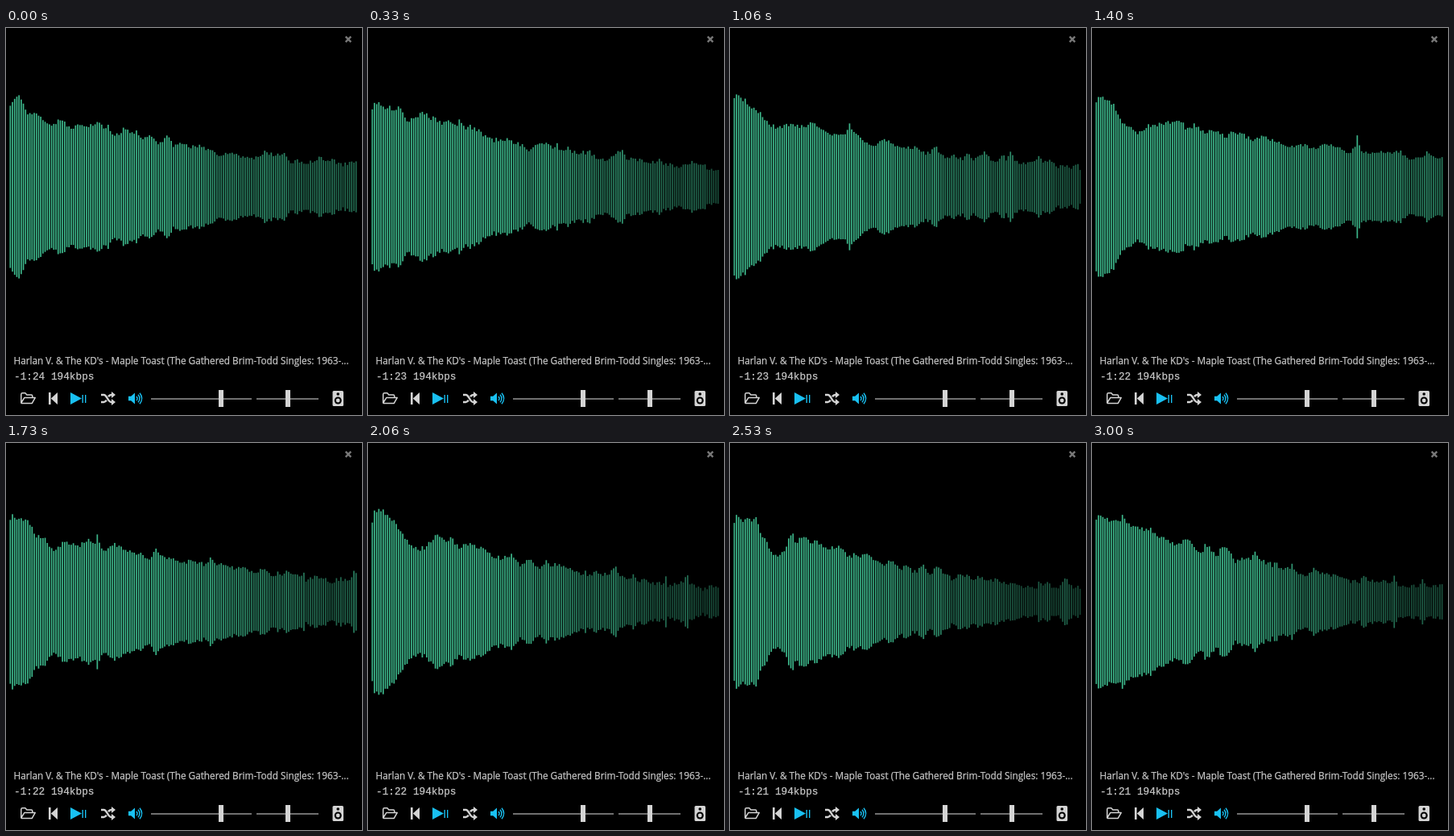
An HTML page with a canvas that plays this animation: 442x480 px, repeating every 3.07 s.

```html
<!DOCTYPE html>
<html lang="en">
<head>
<meta charset="utf-8">
<title>Audio player</title>
<style>
  html, body { margin: 0; width: 100%; height: 100%; overflow: hidden; background: #000; }
  canvas, svg { position: absolute; left: 0; top: 0; }
  text { fill: #c6c6c6; stroke: #c6c6c6; stroke-width: .25px; }
  .title { font: 11.77px "Open Sans", "Noto Sans", sans-serif; }
  .info { font: 12.75px "Liberation Mono", "Courier New", monospace; }
</style>
</head>
<body>
<canvas id="bars" width="442" height="480"></canvas>
<svg width="442" height="480" fill="#d4d4d4">
  <path d="M421.7 10.7l6.6 6.6m0-6.6l-6.6 6.6" stroke="#777" stroke-width="2.4"/>
  <text class="title" x="9.5" y="417">Harlan V. &amp; The KD's - Maple Toast (The Gathered Brim-Todd Singles: 1963-...</text>
  <text class="info" id="info" x="10" y="436"></text>
  <g fill="none" stroke="#d4d4d4" stroke-width="1.5">
    <path d="M18.8 465v-10.5q0-1.7 1.7-1.7h3.4l2 2.2h5.4q1.5 0 1.5 1.5v2.1M18.8 465l4-6.4h13.4l-4 7H19.5z" stroke-linejoin="round"/>
    <path d="M118 455h3.5c4 0 5 9 9 9h2M118 464h3.5c1.4 0 2.4-1 3.3-2.4m2.2-4.3c1-1.4 2-2.3 3.5-2.3h2" stroke-width="2.5"/>
  </g>
  <path d="M131 451l5 4-5 4zM131 460l5 4-5 4z"/>
  <path d="M53 452h2.6v15H53zM64 452v15l-8.2-7.5z"/>
  <g fill="#19c0f2">
    <path d="M80 452l14 7.5L80 467zM94.5 455h1.4v10h-1.4zM98 455h1.4v10H98z"/>
    <path d="M152 456.8h3.2l4.8-4.3v14l-4.8-4.3H152z"/>
    <path d="M162 457q2.2 2.5 0 5m2-7.2q4 4.7 0 9.4m2-11.4q5.4 6.7 0 13.4" fill="none" stroke="#19c0f2" stroke-width="1.4"/>
  </g>
  <path d="M180 459h125v2H180zM311 459h77v2h-77z" fill="#707070"/>
  <rect x="264" y="449" width="6" height="21"/>
  <rect x="347" y="449" width="6" height="21"/>
  <rect x="405.5" y="450" width="13.5" height="19" rx="1.5"/>
  <g fill="#000">
    <circle cx="412.2" cy="454" r="1.8"/>
    <circle cx="412.2" cy="462" r="4.5"/>
  </g>
  <circle cx="412.2" cy="462" r="2.4"/>
</svg>
<script>
const ctx = document.getElementById('bars').getContext('2d');
const info = document.getElementById('info');
const LOOP = 3070, STEPS = 46, BARS = 160, LEFT = 4.5, PITCH = 2.7, MID = 197;

// How the spectrum's shape moves: step, fall-off towards the treble, bass dip
const shape = [
  [0, 1.45, 10], [10, 1.85, 0], [16, 1.6, 14], [21, 1.15, 22],
  [31, 1.9, 22], [38, 2.05, 32], [45, 1.85, 0], [STEPS, 1.45, 10]
];

const lerp = (a, b, f) => a + (b - a) * f;
const bell = d => Math.exp(-d * d);
const hash = (a, b) => {
  const s = Math.sin(a * 12.9898 + b * 78.233) * 43758.5453;
  return s - Math.floor(s);
};

// Smooth noise across neighbouring bars
function ripple(pos, seed) {
  const i = Math.floor(pos);
  return lerp(hash(i, seed), hash(i + 1, seed), pos - i);
}

function shapeAt(step) {
  const next = shape.findIndex(key => key[0] > step);
  const [a, b] = [shape[next - 1], shape[next]];
  const mix = (step - a[0]) / (b[0] - a[0]);
  return [lerp(a[1], b[1], mix), lerp(a[2], b[2], mix)];
}

function halfHeight(i, step, fall, dip) {
  const u = i / (BARS - 1);
  const base = 112 * Math.exp(-fall * u ** (.35 + .35 * fall)) - dip * bell((u - .12) / .05);
  const wave = (ripple(i / 4, step) - .5) * (6 + base * .1);
  const spike = 14 * ripple(i / 2.5, step + 100) ** 6;
  const grain = (hash(i, step + 200) - .5) * 5;
  const attack = i ? 1 : .9;
  return Math.max(4, (base + wave + spike + grain) * attack);
}

function draw(step) {
  const [fall, dip] = shapeAt(step);
  ctx.clearRect(0, 0, 442, 480);
  for (let i = 0; i < BARS; i++) {
    const h = halfHeight(i, step, fall, dip);
    ctx.fillStyle = `rgba(60,182,138,${Math.min(1, .1 + h / 65)})`;
    ctx.fillRect(LEFT + i * PITCH, MID - h, 1.7, h * 2);
  }
  info.textContent = `-1:${24 - Math.floor((step + 13) / 15)} 194kbps`;
}

let shown = -1;
function tick() {
  // 15 steps per second, on a 10 ms clock
  const ticks = Math.floor(performance.now() % LOOP / 10);
  const step = Math.min(STEPS - 1, Math.ceil(3 * (ticks + 1) / 20) - 1);
  if (step !== shown) draw(shown = step);
  requestAnimationFrame(tick);
}
tick();
</script>
</body>
</html>
```
